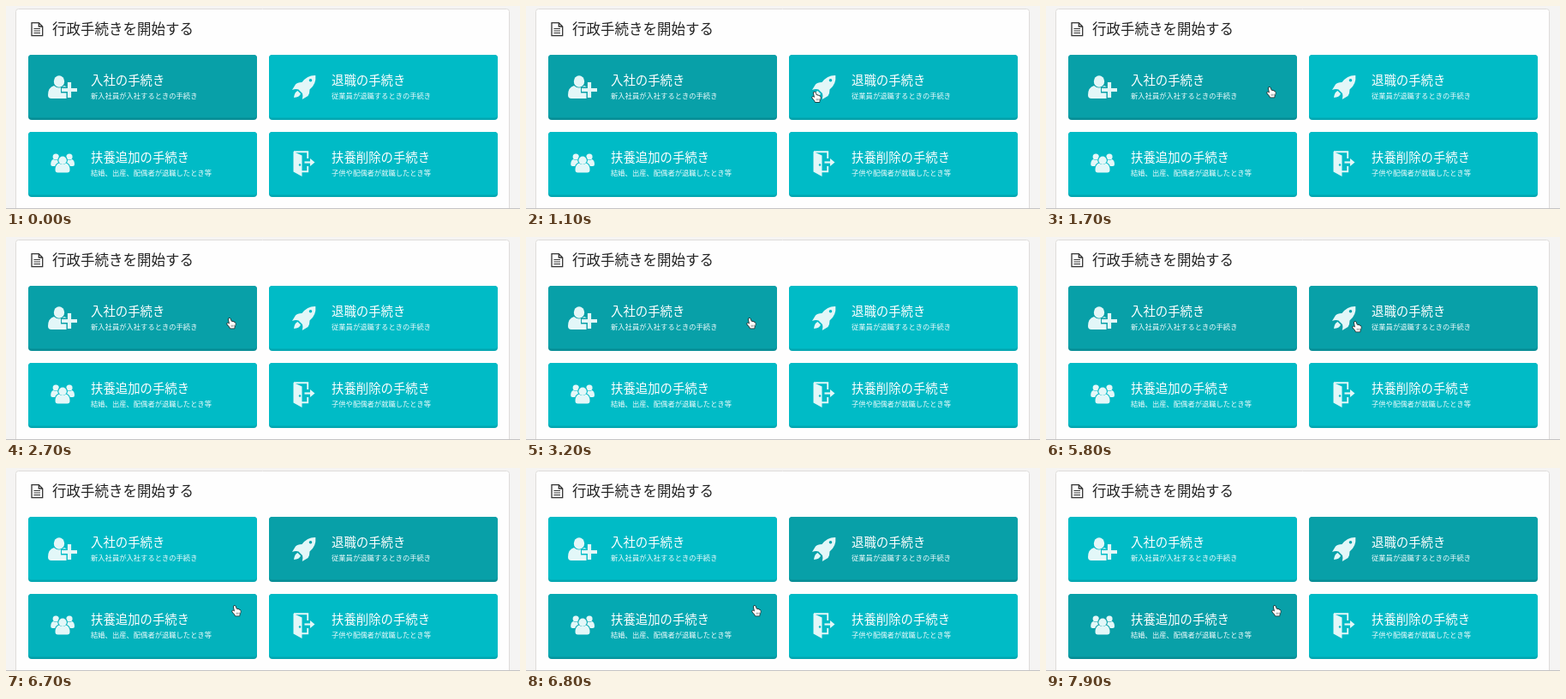
An HTML page with a canvas that plays this animation: 600 px wide and 237 px high, repeating every 8 s.

```html
<!DOCTYPE html>
<html lang="ja">
<head>
<meta charset="utf-8">
<title>行政手続き</title>
<style>
html, body { margin: 0; width: 100%; height: 100%; overflow: hidden; background: #f5f4f3; }
canvas { display: block; width: 600px; height: 237px; }
</style>
</head>
<body>
<canvas id="stage"></canvas>
<script>
const W = 600, H = 237, LOOP = 8000, STEP = 100;
const FONT = '"Noto Sans CJK JP", "Noto Sans CJK", "Noto Sans", sans-serif';
const LIGHT = [0, 187, 198], DARK = [8, 160, 168];
const LIGHT_EDGE = [2, 167, 177], DARK_EDGE = [8, 142, 150];
const INK = '#e3f7f8';

const canvas = document.getElementById('stage');
const dpr = window.devicePixelRatio || 1;
canvas.width = W * dpr;
canvas.height = H * dpr;
const ctx = canvas.getContext('2d');

// Keys are [time, value...]; values between keys are eased.
function track(keys, t) {
  if (t <= keys[0][0]) return keys[0].slice(1);
  for (let i = 1; i < keys.length; i++) {
    const a = keys[i - 1], b = keys[i];
    if (t <= b[0]) {
      const k = (t - a[0]) / (b[0] - a[0]);
      return a.slice(1).map((v, j) => v + (b[j + 1] - v) * k);
    }
  }
  return keys[keys.length - 1].slice(1);
}

function mix(a, b, k) {
  return `rgb(${a.map((v, i) => Math.round(v + (b[i] - v) * k)).join()})`;
}

function text(str, x, y, size, color) {
  ctx.font = `400 ${size}px ${FONT}`;
  ctx.fillStyle = color;
  ctx.fillText(str, x, y);
}

function fillPath(d, color) {
  ctx.fillStyle = color;
  ctx.fill(new Path2D(d), 'evenodd');
}

function strokePath(d, color, width) {
  ctx.strokeStyle = color;
  ctx.lineWidth = width;
  ctx.stroke(new Path2D(d));
}

function disc(x, y, r, color) {
  ctx.fillStyle = color;
  ctx.beginPath();
  ctx.arc(x, y, r, 0, Math.PI * 2);
  ctx.fill();
}

function roundBox(x, y, w, h, r) {
  ctx.beginPath();
  ctx.roundRect(x, y, w, h, r);
}

// Icons use coordinates relative to their card's top left corner.
function userPlus(bg) {
  ctx.fillStyle = INK;
  ctx.beginPath();
  ctx.ellipse(36, 31, 6.2, 6.8, 0, 0, Math.PI * 2);
  ctx.fill();
  fillPath('M30 36 Q36 41 42 36 Q49 38 49 47 Q49 51 45 51 H27 Q23 51 23 47 Q23 38 30 36Z', INK);
  strokePath('M48 31 V51 M38 41 H58', bg, 7);
  strokePath('M48 32 V50 M39 41 H57', INK, 4.2);
}

function rocket(bg) {
  fillPath('M54.3 24 Q45 23.5 38.5 32 Q33 32 31 34.5 L27 41 Q31 39.5 34.5 40.5 L39 45 Q40 48 38.8 52 L45.5 48 Q47.5 45.5 47.5 40.5 Q55.5 34 54.3 24Z', INK);
  fillPath('M33.5 42 Q30 43 29 50 Q35.5 49.5 37 45.5Z', INK);
  disc(48.5, 29.8, 1.8, bg);
}

function people(bg) {
  for (const x of [32.2, 48]) {
    disc(x, 29, 3.6, INK);
    fillPath(`M${x - 3} 32 Q${x} 34 ${x + 3} 32 Q${x + 6} 33 ${x + 6} 38 Q${x + 6} 40 ${x + 4} 40 H${x - 4} Q${x - 6} 40 ${x - 6} 38 Q${x - 6} 33 ${x - 3} 32Z`, INK);
  }
  const body = 'M36 36.5 Q40 39.5 44 36.5 Q48.5 38 48.5 44.5 Q48.5 47.5 45.5 47.5 H34.5 Q31.5 47.5 31.5 44.5 Q31.5 38 36 36.5Z';
  disc(40.1, 33.2, 5.8, bg);
  strokePath(body, bg, 2);
  disc(40.1, 33.2, 4.7, INK);
  fillPath(body, INK);
}

function door(bg) {
  fillPath('M28.5 23 L38.5 27.5 V52 L28.5 46.5Z', INK);
  disc(36, 38.5, 1.2, bg);
  strokePath('M29 23.2 H45.2 V31 M45.2 40 V46.3 H38', INK, 1.9);
  strokePath('M41.5 35.5 H51', INK, 2.2);
  fillPath('M48 31 L53.5 35.5 L48 40Z', INK);
}

const cards = [
  { x: 26, y: 57, icon: userPlus, title: '入社の手続き', note: '新入社員が入社するときの手続き',
    shade: [[5800, 1], [6150, 0]] },
  { x: 307, y: 57, icon: rocket, title: '退職の手続き', note: '従業員が退職するときの手続き',
    shade: [[1000, 0], [1200, 0.5], [1500, 0], [3950, 0], [4300, 1]] },
  { x: 26, y: 147, icon: people, title: '扶養追加の手続き', note: '結婚、出産、配偶者が退職したとき等',
    shade: [[6600, 0], [6900, 1]] },
  { x: 307, y: 147, icon: door, title: '扶養削除の手続き', note: '子供や配偶者が就職したとき等',
    shade: [[0, 0]] }
];

const pointer = [
  [700, 450, -30], [800, 428, -1], [900, 402, 31], [1000, 372, 74], [1100, 339, 106],
  [1200, 303, 111], [1300, 277, 105], [1400, 266, 101], [1500, 263, 100.5],
  [3700, 263, 100.5], [3800, 275, 101], [3900, 306, 102], [4000, 341, 103.5], [4150, 363, 104.5],
  [6200, 363, 104.5], [6300, 354, 111], [6400, 328, 130], [6500, 298, 149], [6600, 277, 162], [6700, 269, 166.5]
];

function drawCard(card, t) {
  const [k] = track(card.shade, t);
  const bg = mix(LIGHT, DARK, k);
  ctx.save();
  ctx.translate(card.x, card.y);
  roundBox(0, 0, 267, 76, 4);
  ctx.fillStyle = mix(LIGHT_EDGE, DARK_EDGE, k);
  ctx.fill();
  roundBox(0, 0, 267, 73.5, 4);
  ctx.fillStyle = bg;
  ctx.fill();
  card.icon(bg);
  text(card.title, 73, 34.6, 14.4, '#fff');
  text(card.note, 73, 51.2, 8.3, '#f0fbfc');
  ctx.restore();
}

function drawPanel() {
  ctx.fillStyle = '#f5f4f3';
  ctx.fillRect(0, 0, W, H);
  roundBox(11.5, 3.5, 576, 250, 3);
  ctx.fillStyle = '#fefefe';
  ctx.fill();
  ctx.strokeStyle = '#dedcda';
  ctx.lineWidth = 1;
  ctx.stroke();
  strokePath('M30 19.7 H38.3 L42.7 24 V34.6 H30Z M38.3 19.7 V24 H42.7', '#333', 1.3);
  strokePath('M32.5 26.5 H40 M32.5 29 H40 M32.5 31.5 H40', '#333', 1.1);
  text('行政手続きを開始する', 54, 33.2, 16.5, '#222');
  ctx.fillStyle = '#c4c3c4';
  ctx.fillRect(0, 236, W, 1);
}

function drawHand(x, y) {
  const d = 'M-3.2 -4.7 Q-2.7 -6.2 -1.3 -5.2 L0 -1.7 Q1 -2.3 1.8 -1.3 Q2.8 -1.8 3.4 -.7 Q4.6 -.8 4.8 .6 Q5 3 3.6 4.6 V6 H-1.3 Q-2 4 -4.2 2 Q-5.4 .6 -4.4 .1 Q-3.4 -.2 -2 1.3Z';
  ctx.save();
  ctx.translate(x, y);
  ctx.lineJoin = 'round';
  strokePath(d, '#222', 1.4);
  fillPath(d, '#fff');
  strokePath('M.2 2.2 V4.4 M1.8 2.2 V4.4 M3.3 2.2 V4.2', '#555', 0.6);
  ctx.restore();
}

function draw(t) {
  ctx.setTransform(dpr, 0, 0, dpr, 0, 0);
  drawPanel();
  for (const card of cards) drawCard(card, t);
  drawHand(...track(pointer, t));
}

const start = performance.now();
function tick() {
  const t = (performance.now() - start) % LOOP;
  draw(Math.floor(t / STEP) * STEP);
  requestAnimationFrame(tick);
}
tick();
</script>
</body>
</html>
```
